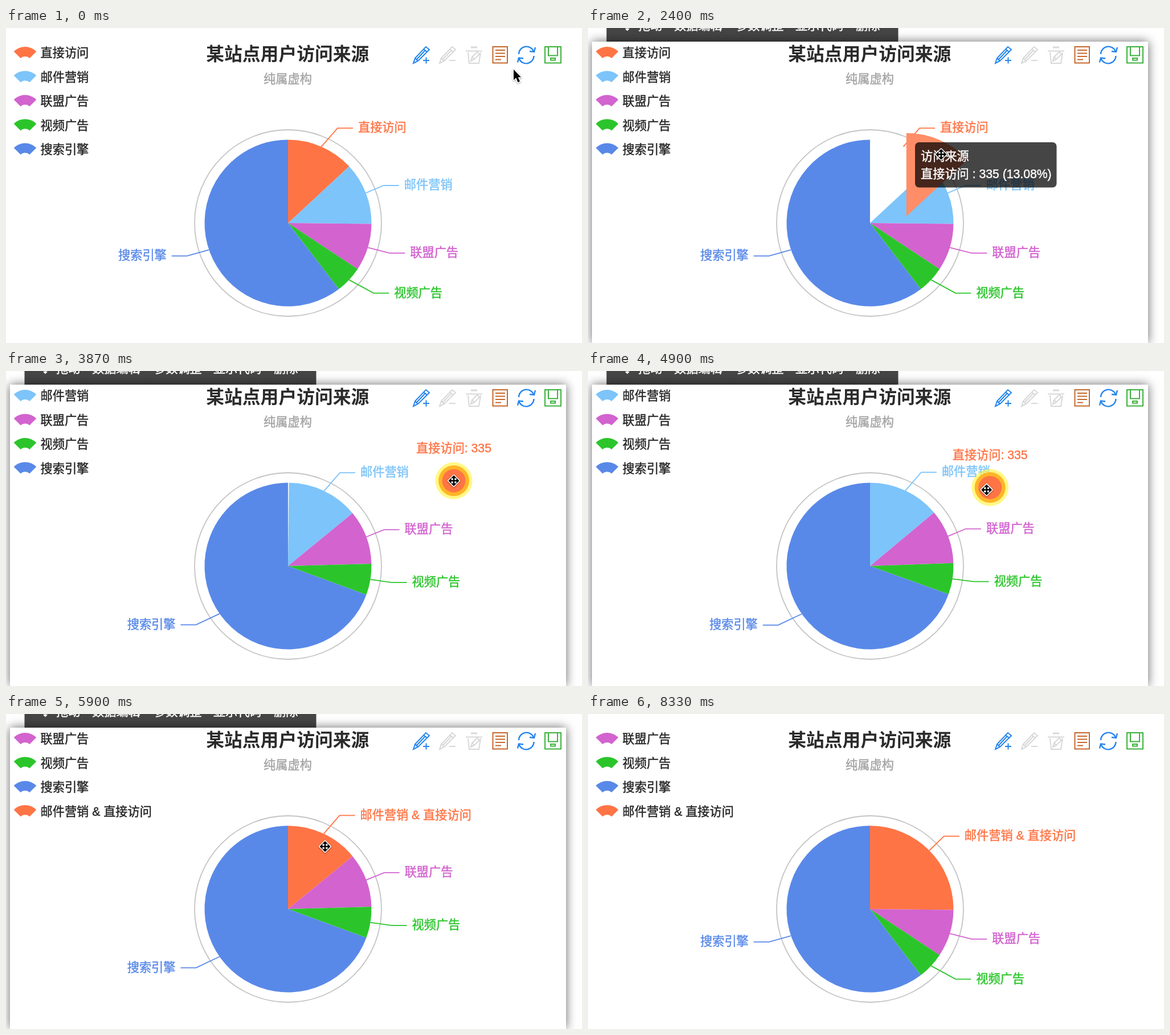
Animation of 1011 by 554 pixels, one loop 8360 ms. Source, as an HTML page with a canvas:

```html
<!DOCTYPE html>
<html lang="zh-CN">
<head>
<meta charset="utf-8">
<style>
html, body { margin: 0; width: 100%; height: 100%; overflow: hidden; background: #fff; }
canvas { display: block; }
</style>
</head>
<body>
<canvas id="stage" width="1011" height="554"></canvas>
<script>
const ctx = document.getElementById('stage').getContext('2d');
const LOOP = 8360, TAU = Math.PI * 2, CX = 495, CY = 343, R = 146.5, LABEL_R = 181.5;
const FONT = '"Liberation Sans", "Noto Sans CJK SC", "Noto Sans CJK", sans-serif';
const ORANGE = '#ff7445', HOVER = '#ff8e68', BLUE = '#2585ee', GREY = '#d8d8d8';

// Event times in ms
const ENTER = 1740, GRAB = 2100, DROP = 3560, ISLAND_GRAB = 4500, OVER = 5160,
      MERGE = 5900, REHOVER = 6350, LEAVE = 7450;

const items = [
  { name: '直接访问', color: ORANGE },
  { name: '邮件营销', color: '#7dc4fa' },
  { name: '联盟广告', color: '#d263cf' },
  { name: '视频广告', color: '#2bc52b' },
  { name: '搜索引擎', color: '#5989e8' }
];
const merged = { name: '邮件营销 & 直接访问', color: ORANGE };
const before = [335, 310, 234, 135, 1548];
const without = [0, 310, 234, 135, 1548];
const after = [0, 645, 234, 135, 1548];

// Cursor path: time, x, y
const cursorKeys = [
  [0, 891, 73], [350, 891, 73], [1450, 540, 235], [1680, 540, 235], [1950, 556, 234], [GRAB, 556, 234],
  [2950, 778, 193], [3080, 778, 193], [3350, 786, 193], [4150, 786, 193], [4400, 780, 197],
  [ISLAND_GRAB, 780, 197], [5370, 598, 224], [5750, 560, 233], [7200, 560, 233], [7600, 600, -30]
];

const clamp = v => Math.max(0, Math.min(1, v));
const mix = (a, b, k) => a + (b - a) * k;
const progress = (t, start, length) => clamp((t - start) / length);
const expOut = k => k >= 1 ? 1 : 1 - 2 ** (-10 * k);

function cursorAt(t) {
  const i = cursorKeys.findIndex(key => key[0] > t);
  if (i < 0) return cursorKeys[cursorKeys.length - 1].slice(1);
  const [t0, x0, y0] = cursorKeys[i - 1], [t1, x1, y1] = cursorKeys[i];
  const p = (t - t0) / (t1 - t0), k = p * p * (3 - 2 * p);
  return [mix(x0, x1, k), mix(y0, y1, k)];
}

// A thin outline gives regular glyphs a medium weight.
function text(str, x, y, color, align = 'left', size = 21.2, weight = 400) {
  ctx.font = `${weight} ${size}px ${FONT}`;
  ctx.textAlign = align;
  ctx.textBaseline = 'alphabetic';
  ctx.fillStyle = ctx.strokeStyle = color;
  ctx.lineWidth = 0.45;
  ctx.fillText(str, x, y + size * 0.37);
  if (weight < 700) ctx.strokeText(str, x, y + size * 0.37);
}

function disc(x, y, r, color) {
  ctx.beginPath();
  ctx.arc(x, y, r, 0, TAU);
  ctx.fillStyle = color;
  ctx.fill();
}

function strokePath(d, color, width = 2) {
  ctx.strokeStyle = color;
  ctx.lineWidth = width;
  ctx.stroke(new Path2D(d));
}

function sectorPath(start, end, dx = 0, dy = 0) {
  ctx.beginPath();
  ctx.moveTo(CX + dx, CY + dy);
  ctx.arc(CX + dx, CY + dy, R, start - TAU / 4, end - TAU / 4);
  ctx.closePath();
}

function drawPanel(alpha) {
  if (!alpha) return;
  ctx.save();
  ctx.globalAlpha = alpha;
  ctx.fillStyle = '#454545';
  ctx.fillRect(32.5, 0, 512, 24);
  [['拖动', 88], ['数据编辑', 151], ['参数调整', 259], ['显示代码', 364], ['删除', 470]]
    .forEach(([label, x]) => text(label, x, -5, '#fff'));
  strokePath('M69-8V4M66 1l3 3 3-3', '#fff', 1.8);
  ctx.shadowColor = 'rgba(0,0,0,.6)';
  ctx.shadowBlur = 17;
  ctx.fillStyle = '#fff';
  ctx.fillRect(7, 24, 976, 530);
  ctx.restore();
}

function drawLegend(list) {
  list.forEach((item, i) => {
    const y = 61 + i * 42.4;
    ctx.beginPath();
    ctx.arc(33.5, y, 28, -TAU * 3 / 8, -TAU / 8);
    ctx.arc(33.5, y, 11, -TAU / 8, -TAU * 3 / 8, true);
    ctx.fillStyle = item.color;
    ctx.fill();
    text(item.name, 60.5, y - 17.5, '#262626');
  });
}

function drawToolbox() {
  const pencil = 'M715 62l3-9 19-20 6 5-20 20zM718 53l5 5M733 37l6 5M721 55l15-16';
  strokePath(pencil + 'M732 57h11M737.5 51.500v11', BLUE);
  ctx.save();
  ctx.translate(46, 0);
  strokePath(pencil + 'M732 57h11', GREY);
  ctx.restore();
  strokePath('M807 40.500h29M816 34h11M811 43l2 19h17l3-19M816 58l2-7 9-9 4 4-9 9zM818 51l4 4', GREY);
  strokePath('M816 34h11', GREY, 3);
  strokePath('M854.500 33h25.500v28.500h-25.500zM859 39h17M859 44.500h17M859 50h17M859 55.500h10', '#c5682c');
  strokePath('M900 46a13.500 13.500 0 0 1 26-5M926.500 49a13.500 13.500 0 0 1-26 5', BLUE, 2.4);
  strokePath('M919 41l8 1 2-8M908 53.500l-8-1-2 8', BLUE, 2.4);
  strokePath('M946 33h28v28.500h-28zM952 33v15.500h16v-15.500M956 53h8v3.500h-8z', '#3cb13c');
}

function drawLabel(item, mid) {
  const side = mid > TAU / 2 ? -1 : 1;
  const angle = side > 0 ? mid : TAU - mid;
  const d = angle * 360 / TAU - 63;
  const spread = d < 0 ? 16 * (-d / 39.5) ** 2.4 : 19 * (d / 70) ** 2.4;
  const y = CY - 0.5 - LABEL_R * Math.cos(angle);
  const at = offset => CX + side * (LABEL_R * Math.sin(angle) + spread - 1.5 + offset);
  ctx.beginPath();
  ctx.moveTo(CX + side * R * Math.sin(angle), CY - R * Math.cos(angle));
  ctx.lineTo(at(0), y);
  ctx.lineTo(at(27), y);
  ctx.strokeStyle = item.color;
  ctx.lineWidth = 1.8;
  ctx.stroke();
  text(item.name, at(36), y - 1.5, item.color, side > 0 ? 'left' : 'right');
}

function drawPie(t, shift) {
  const from = t < MERGE ? before : without, to = t < MERGE ? without : after;
  const k = expOut(progress(t, t < MERGE ? DROP : MERGE, 500));
  const share = values => values.map(v => v / values.reduce((a, b) => a + b));
  const a = share(from), b = share(to);

  ctx.beginPath();
  ctx.arc(CX, CY, 164, 0, TAU);
  ctx.strokeStyle = '#c4c4c4';
  ctx.lineWidth = 1.8;
  ctx.stroke();

  let angle = 0;
  const slices = items.map((item, i) => {
    const start = angle;
    angle += mix(a[i], b[i], k) * TAU;
    return { item: i === 1 && t >= MERGE ? merged : item, start, end: angle };
  }).slice(t < DROP ? 0 : 1);

  const hovered = t >= ENTER && t < DROP || t >= REHOVER && t < 7290;
  const fillSlice = (s, color, dx, dy) => {
    sectorPath(s.start, s.end, dx, dy);
    ctx.fillStyle = color;
    ctx.fill();
  };
  slices.forEach((s, i) => {
    if (i || t >= DROP) fillSlice(s, i === 0 && hovered ? HOVER : s.item.color);
  });
  slices.forEach(s => drawLabel(s.item, (s.start + s.end) / 2));
  if (t < DROP) fillSlice(slices[0], hovered ? HOVER : ORANGE, ...shift);

  if (t >= OVER && t < MERGE) {
    sectorPath(slices[0].start, slices[0].end);
    ctx.lineJoin = 'round';
    ctx.strokeStyle = 'rgba(240,152,36,.88)';
    ctx.lineWidth = 18;
    ctx.stroke();
    ctx.lineJoin = 'miter';
  }
}

function drawTooltip(alpha) {
  ctx.save();
  ctx.globalAlpha = alpha;
  ctx.beginPath();
  ctx.roundRect(574, 201, 248.5, 79.5, 7);
  ctx.fillStyle = 'rgba(0,0,0,.73)';
  ctx.fill();
  text('访问来源', 584, 225, '#fff');
  text('直接访问 : 335 (13.08%)', 584, 256.5, '#fff');
  ctx.restore();
}

function drawIsland(x, y) {
  disc(x, y, 32.5, 'rgba(255,245,70,.65)');
  disc(x, y, 27, '#ffb526');
  disc(x, y, 20.5, ORANGE);
  text('直接访问: 335', x, y - 57.5, ORANGE, 'center');
}

function drawCursor(x, y, moving) {
  ctx.save();
  ctx.translate(x, y);
  ctx.lineJoin = 'round';
  ctx.shadowColor = 'rgba(0,0,0,.4)';
  ctx.shadowBlur = 3;
  ctx.shadowOffsetY = 1;
  const shape = new Path2D(moving ? 'M0-9.500L9.500 0 0 9.500-9.500 0z'
    : 'M0 0V18.500L4.300 14.500 7.500 22.500 11 21 7.700 13.500H13z');
  ctx.strokeStyle = '#fff';
  ctx.lineWidth = 3;
  ctx.stroke(shape);
  ctx.shadowColor = 'transparent';
  ctx.fillStyle = '#000';
  ctx.fill(shape);
  if (moving) {
    ctx.fillStyle = '#fff';
    for (const dx of [-4.5, 1.2]) for (const dy of [-4.5, 1.2]) ctx.fillRect(dx, dy, 3.3, 3.3);
  }
  ctx.restore();
}

function draw(t) {
  const [x, y] = cursorAt(t);
  ctx.fillStyle = '#fff';
  ctx.fillRect(0, 0, 1011, 554);
  drawPanel(progress(t, ENTER, 250) * (1 - progress(t, LEAVE, 300)));
  drawLegend(t < DROP ? items : t < MERGE ? items.slice(1) : [...items.slice(2), merged]);
  text('某站点用户访问来源', CX - 0.7, 45.5, '#2b2b2b', 'center', 31.8, 700);
  text('纯属虚构', CX - 0.5, 89.5, '#a5a5a5', 'center');
  drawToolbox();
  drawPie(t, t < GRAB ? [0, 0] : [x - 556, y - 234]);
  if (t >= ENTER && t < DROP) drawTooltip(progress(t, ENTER, 200));
  if (t >= DROP && t < MERGE) {
    drawIsland(...(t < ISLAND_GRAB ? [786, 193] : [x + 6, y - 4]));
  }
  drawCursor(x, y, t >= ENTER && t < 7290);
}

const origin = performance.now();
function tick() {
  draw((performance.now() - origin) % LOOP);
  requestAnimationFrame(tick);
}
tick();
</script>
</body>
</html>
```
